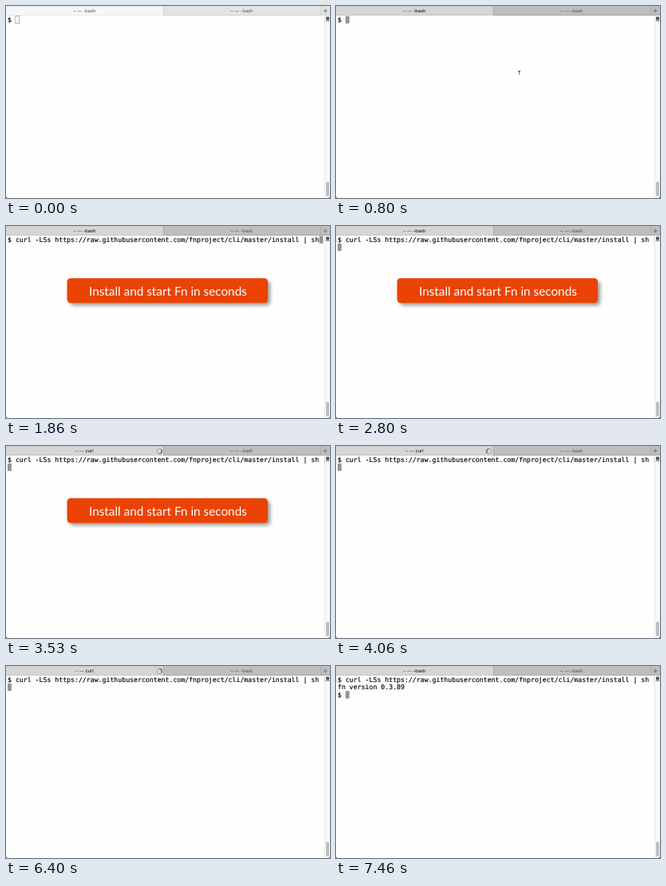
Animation, 406 px wide and 240 px high, one loop 8000 ms. Source, as an HTML page:

```html
<!DOCTYPE html>
<html lang="en">
<head>
<meta charset="utf-8">
<title>Terminal install</title>
<style>
  html, body { margin: 0; width: 100%; height: 100%; overflow: hidden; background: #fefefc; }
  svg { display: block; width: 406px; height: 240px; }
  text { text-rendering: geometricPrecision; white-space: pre; }
  .tab { font: 5.7px Inter, "Liberation Sans", sans-serif; text-anchor: middle; fill: #555; }
  .mono { font: 8.21px "DejaVu Sans Mono", monospace; fill: #000; stroke: #000; stroke-width: .15px; }
  .banner { font: 15.32px Lato, sans-serif; text-anchor: middle; fill: #fff; }
</style>
</head>
<body>
<svg viewBox="0 0 406 240">
  <defs>
    <filter id="blur" x="-10%" y="-40%" width="120%" height="180%"><feGaussianBlur stdDeviation="2"/></filter>
  </defs>
  <rect width="406" height="240" fill="#fefefc"/>

  <!-- tab bar -->
  <rect id="barBack" width="406" height="12"/>
  <rect id="barFront" y=".5" width="197" height="11"/>
  <path id="barLines" d="M197 11.5H406M197.5 0V11M394.5 0V11" fill="none"/>
  <text class="tab" x="98.2" y="8.1">~ — <tspan id="title">-bash</tspan></text>
  <text class="tab" x="295.3" y="8.1">~ — -bash</text>
  <path d="M397.5 6.1h5.4M400.2 3.4v5.4" stroke="#666" stroke-width=".8"/>
  <g id="spinner" fill="none">
    <circle cx="192" cy="6.5" r="3.2" stroke="#a6a6a6" stroke-width=".9"/>
    <circle id="arc" cx="192" cy="6.5" r="3.2" stroke="#6a6a6a" stroke-width="1.3" pathLength="360" stroke-dasharray="130 230"/>
  </g>

  <!-- scroll bar and window corners -->
  <rect x="399" y="12" width="7" height="228" fill="#f9f9f9"/>
  <path d="M399.5 12V240" stroke="#e7e7e7"/>
  <rect x="401" y="219.5" width="4" height="18.5" rx="2" fill="#bcbebd"/>
  <rect x="401" y="13.5" width="4" height="4" fill="#555"/>
  <path d="M400.6 18.6h4.9" stroke="#777" stroke-width=".9"/>
  <path d="M0 238.4V240h1.6zM406 238.4V240h-1.6z" fill="#555"/>

  <!-- shell -->
  <path id="marks" d="M1.2 13.2H.5V21.2H1.2M397.8 13.2h.7v8h-.7" fill="none" stroke="#ccc" stroke-width=".5"/>
  <text id="line0" class="mono" x="2" y="19.9"></text>
  <text id="line1" class="mono" x="2" y="29.3"></text>
  <text id="line2" class="mono" x="2" y="38.7"></text>
  <rect id="cursor" width="4.9" height="9.3" stroke="#999"/>

  <!-- pointer -->
  <path id="arrow" d="M0 0V9L2.1 7.1 3.6 10.5 5 9.9 3.6 6.6H6.4Z" fill="#111" stroke="#fff" stroke-width=".6"/>
  <path id="beam" d="M228 81.5h3.2M229.6 81.5v4" fill="none" stroke="#333" stroke-width=".8"/>

  <g id="banner">
    <rect x="80" y="68.5" width="251.4" height="31" rx="5" fill="#000" opacity=".36" filter="url(#blur)"/>
    <rect x="76.5" y="65.2" width="251.6" height="31" rx="4.5" fill="#ea4304"/>
    <text class="banner" x="202.9" y="86.7">Install and start Fn in seconds</text>
  </g>
</svg>
<script>
const COMMAND = 'curl -LSs https://raw.githubusercontent.com/fnproject/cli/master/install | sh';
const COLUMN = 4.943, ROW = 9.4, LOOP = 8000, TICK = 1000 / 15;
const $ = id => document.getElementById(id);
const show = (id, on) => $(id).setAttribute('visibility', on ? 'visible' : 'hidden');
const set = (id, attrs) => Object.entries(attrs).forEach(([k, v]) => $(id).setAttribute(k, v));
const write = (id, text) => { if ($(id).textContent !== text) $(id).textContent = text; };
const within = (t, from, to) => t >= from && t < to;

function draw(t) {
  const focused = t >= 800, pasted = t >= 1860, entered = t >= 2800, done = t >= 7460;
  const running = within(t, 2930, 7460);

  set('barBack', { fill: focused ? '#bebebe' : '#e4e4e4' });
  set('barFront', { fill: focused ? '#d5d5d5' : '#f6f6f9' });
  set('barLines', { stroke: focused ? '#aaa' : '#d2d2d2' });
  set('title', { fill: focused ? '#000' : '#555' });
  write('title', running ? 'curl' : '-bash');

  show('spinner', within(t, 3330, 7460));
  const step = Math.floor((t + 4) / TICK);
  set('arc', { transform: `rotate(${(step * 24 + 128) % 360} 192 6.5)` });

  show('marks', entered);
  write('line0', '$ ' + (pasted ? COMMAND : ''));
  write('line1', done ? 'fn version 0.3.89' : '');
  write('line2', done ? '$ ' : '');

  const row = done ? 2 : entered ? 1 : 0;
  const column = done || !pasted ? 2 : entered ? 0 : COMMAND.length + 2;
  set('cursor', {
    x: 2 + column * COLUMN, y: 12.5 + row * ROW,
    fill: focused ? '#959595' : 'none', 'stroke-width': focused ? 0 : .8
  });

  show('arrow', within(t, 330, 660));
  const glide = t < 400 ? 0 : t < 460 ? .6 : 1;
  set('arrow', { transform: `translate(${339 - 109.5 * glide} ${69.5 + 12.5 * glide})` });
  show('beam', within(t, 660, 1060));
  show('banner', within(t, 1060, 4060));
}

const start = performance.now();
function frame() {
  draw((performance.now() - start) % LOOP);
  requestAnimationFrame(frame);
}
frame();
</script>
</body>
</html>
```
